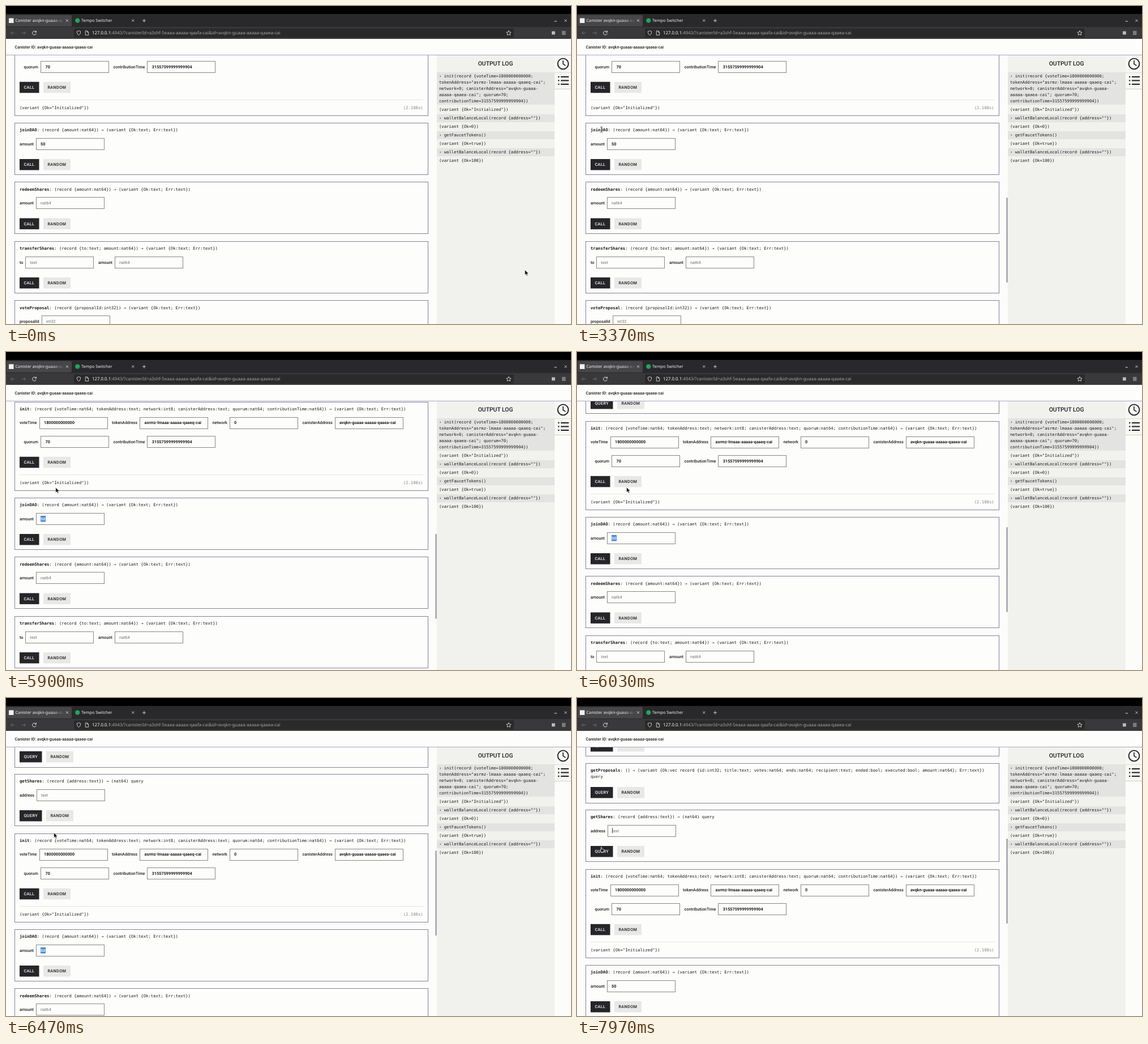
Animation of 998x561 px, one loop 8 s. Source, as an HTML page:

```html
<!DOCTYPE html>
<html lang="en">
<head>
<meta charset="utf-8">
<title>Canister</title>
<style>
html, body { margin: 0; width: 100%; height: 100%; overflow: hidden; background: #fcfcfa; }
svg { display: block; width: 998px; height: 561px; }
text { white-space: pre; text-rendering: geometricPrecision; fill: #1d1d20; }
.mono { font: 7.28px "DejaVu Sans Mono", monospace; }
.b { font-weight: 700; }
.label { font: 500 7.28px Roboto, sans-serif; }
.value { font: 700 7.28px Roboto, sans-serif; }
.hint { font: 400 7.28px Roboto, sans-serif; fill: #707070; }
.btn { font: 500 7.28px Roboto, sans-serif; letter-spacing: .38px; }
.head { font: 500 10.4px Roboto, sans-serif; }
.tab { font: 7.3px "Noto Sans", sans-serif; fill: #f0f0f0; }
.url { font: 7.84px "Noto Sans", sans-serif; fill: #a6a6a6; }
.light { fill: #fafafa; }
.grey { fill: #85857f; }
</style>
</head>
<body>
<svg id="stage" viewBox="0 0 998 561"></svg>
<script>
const esc = s => s.replace(/&/g, "&amp;").replace(/</g, "&lt;");
const text = (x, y, s, cls) => `<text x="${x}" y="${y}" class="${cls}">${esc(s)}</text>`;
const rect = (x, y, w, h, fill, more = "") =>
  `<rect x="${x}" y="${y}" width="${w}" height="${h}" fill="${fill}" ${more}/>`;
// one crisp pixel of border inside the box
const frame = (x, y, w, h, color) =>
  rect(Math.floor(x) + .5, Math.round(y) + .5, w - 1, h - 1, "#fdfdfb", `stroke="${color}"`);
const line = (d, color, w = 1, more = "") =>
  `<path d="${d}" fill="none" stroke="${color}" stroke-width="${w}" ${more}/>`;

// field: [label, label x, box x, value, placeholder?]
function field([name, lx, bx, value, hint], y, id = "") {
  return text(lx, y + 12.8, name, "label") + frame(bx, y, 121, 21, "#888885") +
    (id ? `<rect id="mark" x="61" y="${y + 5}" width="9" height="10.5" fill="#3f86d2"/>` : "") +
    `<text ${id} x="${bx + 8}" y="${y + 12.8}" class="${hint ? "hint" : "value"}">${value}</text>`;
}

function buttons(y, verb) {
  const w = verb === "CALL" ? 34.5 : 39.5;
  return rect(24, y, w, 19.5, "#262529") + text(31.4, y + 12.4, verb, "btn light") +
    rect(w + 31.5, y, 48, 19.5, "#e8e8e7") + text(w + 38.9, y + 12.4, "RANDOM", "btn");
}

function card(y, h, name, type, verb, rows = [], extra = "") {
  const [first, second] = type.split("\n");
  let out = frame(15, y, 731, h, "#85829c") +
    `<text x="24" y="${y + 15.4}" class="mono"><tspan class="b">${name}</tspan>: ${first}</text>`;
  if (second) out += text(24, y + 26.3, second, "mono");
  rows.forEach((row, i) => row.forEach(f =>
    out += field(f, y + 27 + i * 33.3, name === "joinDAO" ? 'id="amount"' : "")));
  const by = rows.length ? 30.7 + rows.length * 33.3 : 42;
  return out + buttons(y + by, verb) + extra;
}

const result = "(variant {Ok:text; Err:text})";
const amount = "(record {amount:nat64}) → " + result;
const cards =
  card(-254, 92, "getProposal", "(record {id:int32}) → (variant {Ok:text; Err:text}) query", "QUERY",
    [[["id", 24, 36, "int32", 1]]]) +
  card(-150, 71, "getProposals", "() → (variant {Ok:vec record {id:int32; title:text; votes:nat64; " +
    "ends:nat64; recipient:text; ended:bool; executed:bool; amount:nat64}; Err:text})\nquery", "QUERY") +
  card(-68, 92, "getShares", "(record {address:text}) → (nat64) query", "QUERY",
    [[["address", 24, 54, "text", 1]]]) +
  card(36.5, 157, "init", "(record {voteTime:nat64; tokenAddress:text; network:int8; " +
    "canisterAddress:text; quorum:nat64; contributionTime:nat64}) → " + result, "CALL",
    [[["voteTime", 24, 59, "1800000000000"],
      ["tokenAddress", 187, 236.5, "asrmz-lmaaa-aaaaa-qaaeq-cai"],
      ["network", 364.5, 395, "0"],
      ["canisterAddress", 523.5, 581, "avqkn-guaaa-aaaaa-qaaea-cai"]],
     [["quorum", 31.5, 61.5, "70"],
      ["contributionTime", 189.5, 249.8, "31557599999999904"]]],
    rect(24, 165, 713, 1, "#e4e4ec") + text(24, 181.8, '(variant {Ok="Initialized"})', "mono") +
    text(701.7, 181.8, "(2.108s)", "mono grey")) +
  card(206, 92, "joinDAO", amount, "CALL", [[["amount", 24, 53, "50"]]]) +
  card(310.4, 92, "redeemShares", amount, "CALL", [[["amount", 24, 53, "nat64", 1]]]) +
  card(414.8, 92, "transferShares", "(record {to:text; amount:nat64}) → " + result, "CALL",
    [[["to", 24, 34.5, "text", 1], ["amount", 163, 192, "nat64", 1]]]) +
  card(519.2, 92, "voteProposal", "(record {proposalId:int32}) → " + result, "CALL",
    [[["proposalId", 24, 63, "int32", 1]]]);

const calls = [["(variant {Ok=\"Initialized\"})"], ["› walletBalanceLocal(record {address=\"\"})", 1],
  ["(variant {Ok=0})"], ["› getFaucetTokens()", 1], ["(variant {Ok=true})"],
  ["› walletBalanceLocal(record {address=\"\"})", 1], ["(variant {Ok=100})"]];
const log = rect(761, 87, 208, 474, "#f1f1ee") + text(833.7, 105.4, "OUTPUT LOG", "head") +
  rect(761, 117, 208, 57, "#e3e3e1") +
  ["› init(record {voteTime=1800000000000;", 'tokenAddress="asrmz-lmaaa-aaaaa-qaaeq-cai";',
   'network=0; canisterAddress="avqkn-guaaa-', 'aaaaa-qaaea-cai"; quorum=70;',
   "contributionTime=31557599999999904})"]
    .map((s, i) => text(765, 126.4 + i * 10.9, s, "mono")).join("") +
  calls.map(([s, called], i) => (called ? rect(761, Math.round(175.6 + i * 15.08), 208, 14, "#e3e3e1") : "") +
    text(765, 184.8 + i * 15.08, s, "mono")).join("");

const side = rect(969, 87, 29, 474, "#fcfcfa") +
  rect(969, 87, 29, 59, "#f7f7f3") + rect(969, 117, 29, 1, "#dedecf") + rect(969, 146, 29, 1, "#d2d2b8") +
  `<circle cx="984" cy="102" r="9.4" fill="none" stroke="#1d1d20" stroke-width="1.9"/>` +
  line("M984 96v6.3l4.4 2.8", "#1d1d20", 1.6) +
  [125, 131.5, 138].map(y => rect(975, y - 1, 2.4, 2, "#1d1d20") + rect(980, y - 1, 14, 2, "#1d1d20")).join("");

const cross = (x, y, r) => line(`M${x - r} ${y - r}l${2 * r} ${2 * r}m0 ${-2 * r}l${-2 * r} ${2 * r}`, "#dcdcdc", .9);
const chrome = rect(0, 0, 998, 14, "#000") + rect(0, 14, 998, 24, "#29292b") +
  rect(1, 16, 115, 20, "#464648", 'rx="2"') +
  rect(5, 21.5, 8.5, 8.5, "#f0f0ee") +
  `<g mask="url(#fade)">${text(16.5, 28.2, "Canister avqkn-guaaa-aaaaa", "tab")}</g>` +
  `<circle cx="126.3" cy="25.6" r="4.2" fill="#22a35a"/>` + text(133, 28.2, "Tempo Switcher", "tab") +
  cross(108, 25.6, 2) + cross(224.3, 25.6, 2) +
  line("M241 25.8h6m-3-3v6", "#dcdcdc", .9) + line("M968.5 27h4.5", "#dcdcdc", 1) + cross(988.5, 25.7, 2) +
  rect(0, 37, 998, 21, "#39393b") + rect(120, 39.5, 777, 16, "#2a2a2b", 'rx="2"') +
  line("M15.5 47.6h-7m3-3l-3 3 3 3M27.5 47.6h7m-3-3l3 3-3 3", "#6c6c6e", 1) +
  line("M52.8 45.7a3.4 3.4 0 1 0 .5 2.8M53.4 43.6v2.6h-2.7", "#e8e8e8", 1) +
  line("M128.5 43.7l3.2 1.2c0 3.2-.9 5.2-3.2 6.6-2.3-1.4-3.2-3.4-3.2-6.6z", "#dcdcdc", .9) +
  line("M140.3 43.9h3.2l2.2 2.2v5.2h-5.4zM143.3 44v2.3h2.4", "#dcdcdc", .9) +
  `<text x="152" y="50.3" class="url"><tspan class="light">127.0.0.1</tspan>` +
  esc(":4943/?canisterId=a3shf-5eaaa-aaaaa-qaafa-cai&id=avqkn-guaaa-aaaaa-qaaea-cai") + "</text>" +
  line("M888 43.4l1.2 2.7 3 .3-2.2 2 .6 3-2.6-1.6-2.6 1.6.6-3-2.2-2 3-.3z", "#dcdcdc", .9) +
  rect(964, 44.6, 5.8, 5.8, "#bcbcbc") +
  line("M982 45h6.5M982 47.5h6.5M982 50h6.5", "#e8e8e8", .9) +
  rect(0, 58, 998, 29, "#fdfdfb") + rect(0, 86, 998, 1, "#aaa8c8") +
  text(15.5, 75.3, "Canister ID: avqkn-guaaa-aaaaa-qaaea-cai", "label");

const beam = "M-2-4.5h1.3l.7.6.7-.6h1.3M-2 4.5h1.3l.7-.6.7.6h1.3M0-4v8";
const pointers = {
  arrow: `<path d="M-.5-.5v9.2l2.1-1.9 1.4 3.1 1.6-.7-1.4-3h3z" fill="#111" stroke="#fff" stroke-width=".6"/>`,
  beam: line(beam, "#fff", 1.8) + line(beam, "#222", .9),
  hand: `<path d="M-.7 0q.7-.9 1.4 0v3l3.4.8q.8.3.6 1.2l-.7 3.3h-4l-2.6-3.2q.1-.9 1-.5l.9.7z"
    fill="#111" stroke="#fff" stroke-width=".7"/>`
};

const $ = id => document.getElementById(id);
$("stage").innerHTML = `<defs><linearGradient id="g" gradientUnits="userSpaceOnUse" x1="82" x2="103">
  <stop stop-color="#fff"/><stop offset="1" stop-color="#000"/></linearGradient>
  <mask id="fade" maskUnits="userSpaceOnUse" x="0" y="14" width="120" height="24">
  <rect y="14" width="120" height="24" fill="url(#g)"/></mask></defs>` +
  rect(0, 0, 998, 561, "#fcfcfa") +
  `<g id="page">${cards}${rect(0, 0, .8, 9.5, "#222", 'id="caret"')}</g>` +
  rect(758.6, 0, 1.9, 150, "#85879a", 'id="thumb" rx="1"') + log + side + chrome +
  Object.keys(pointers).map(k => `<g id="${k}">${pointers[k]}</g>`).join("");

const scroll = [[5630, 0], [5750, 12], [6030, 85], [6250, 150], [6470, 201.4], [6650, 235],
  [6830, 257.4], [7000, 263], [7150, 265]];
const path = [[30, 917, 466], [500, 640, 566], [2150, 596, 563], [2170, 596, 559.5], [2970, 62, 250],
  [3400, 43, 217.5], [3770, 43, 217.5], [4270, 75, 243.5], [4600, 75, 243.5], [4830, 64, 243.5],
  [5150, 57, 243.5], [5270, 57, 243.5], [5470, 89, 242], [5630, 89, 241], [6030, 88, 239],
  [6470, 85, 238], [6830, 78, 225], [7350, 78, 225], [7970, 43, 263.5]];
const shapes = [[0, "arrow"], [2940, "beam"], [5780, "arrow"], [6700, "beam"], [7500, "arrow"], [7860, "hand"]];

function at(keys, t, ease = p => p) {
  const i = keys.findIndex(k => k[0] > t);
  if (i < 1) return (i ? keys[keys.length - 1] : keys[0]).slice(1);
  const a = keys[i - 1], b = keys[i], p = ease((t - a[0]) / (b[0] - a[0]));
  return a.slice(1).map((v, j) => v + (b[j + 1] - v) * p);
}

const show = (el, on) => el.setAttribute("visibility", on ? "visible" : "hidden");
const start = performance.now();

function draw() {
  const t = (performance.now() - start) % 8000;
  const y = Math.round(at(scroll, t)[0]);
  $("page").setAttribute("transform", `translate(0 ${y})`);
  $("thumb").setAttribute("y", 338 - y * .34);
  show($("thumb"), t > 2200);

  const selected = t >= 5050 && t < 7350;
  show($("mark"), selected);
  $("amount").style.fill = selected ? "#fff" : "";
  const typing = t >= 7350;
  $("caret").setAttribute("x", typing ? 62.2 : 69.4);
  $("caret").setAttribute("y", typing ? -36 : 238.5);
  show($("caret"), typing || t >= 4600 && t < 5050);

  const [cx, cy] = at(path, t, p => p * p * (3 - 2 * p));
  const shape = shapes.filter(s => s[0] <= t).pop()[1];
  for (const k in pointers) {
    show($(k), k === shape);
    $(k).setAttribute("transform", `translate(${cx} ${cy})`);
  }
  requestAnimationFrame(draw);
}
draw();
</script>
</body>
</html>
```
